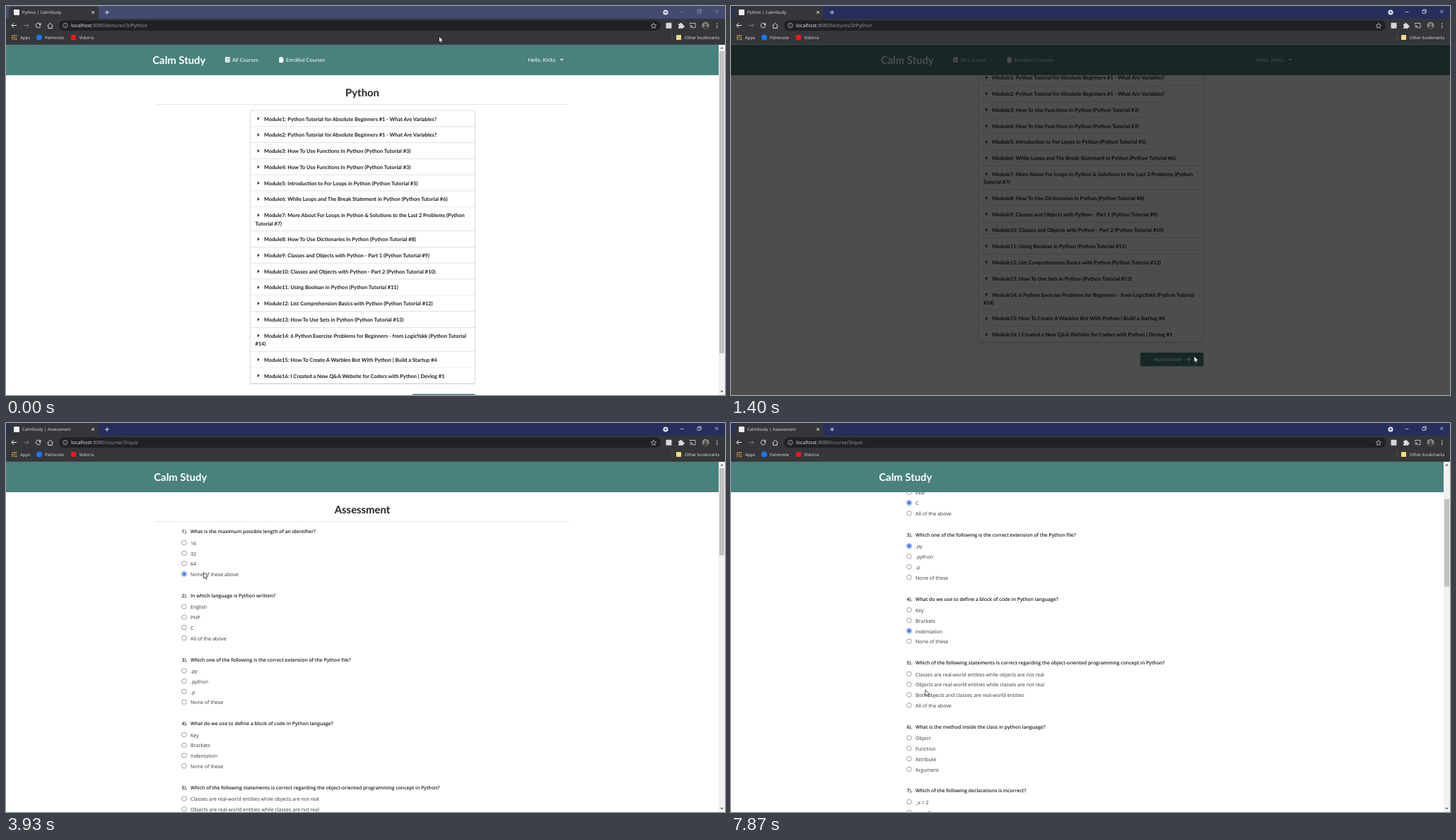
An HTML page with a canvas for the animation above (8 s loop, 1017 by 551 pixels).

```html
<!DOCTYPE html>
<html lang="en">
<head>
<meta charset="utf-8">
<title>Course assessment</title>
<style>
html, body { margin: 0; width: 100%; height: 100%; overflow: hidden; background: #fff; }
canvas { display: block; }
</style>
</head>
<body>
<canvas id="stage" width="1017" height="551"></canvas>
<script>
const W = 1017, H = 551, LOOP = 8000, TOP = 55;
const TEAL = '#48817d', BAR = '#35363a', ICON = '#dcdde0';
const LATO = 'Lato, sans-serif', SANS = '"Open Sans", "Noto Sans", sans-serif';
const BRAND = 'Calm Study', SITE = 'CalmStudy';
const c = document.getElementById('stage').getContext('2d', { alpha: false });

const modules = [
  'Python Tutorial for Absolute Beginners #1 - What Are Variables?',
  'Python Tutorial for Absolute Beginners #1 - What Are Variables?',
  'How To Use Functions In Python (Python Tutorial #3)',
  'How To Use Functions In Python (Python Tutorial #3)',
  'Introduction to For Loops in Python (Python Tutorial #5)',
  'While Loops and The Break Statement in Python (Python Tutorial #6)',
  'More About For Loops in Python & Solutions to the Last 2 Problems (Python\nTutorial #7)',
  'How To Use Dictionaries In Python (Python Tutorial #8)',
  'Classes and Objects with Python - Part 1 (Python Tutorial #9)',
  'Classes and Objects with Python - Part 2 (Python Tutorial #10)',
  'Using Boolean in Python (Python Tutorial #11)',
  'List Comprehension Basics with Python (Python Tutorial #12)',
  'How To Use Sets in Python (Python Tutorial #13)',
  '6 Python Exercise Problems for Beginners - from LogicYakk (Python Tutorial\n#14)',
  'How To Create A Warblen Bot With Python | Build a Startup #4',
  'I Created a New Q&A Website for Coders with Python | Devlog #1'
];

const ABOVE = 'All of the above', NONE = 'None of these';
// question, options, chosen option, time of the choice
const quiz = [
  ['What is the maximum possible length of an identifier?', ['16', '32', '64', 'None of these above'], 3, 3670],
  ['In which language is Python written?', ['English', 'PHP', 'C', ABOVE], 2, 4470],
  ['Which one of the following is the correct extension of the Python file?', ['.py', '.python', '.p', NONE], 0, 5470],
  ['What do we use to define a block of code in Python language?', ['Key', 'Brackets', 'Indentation', NONE], 2, 6270],
  ['Which of the following statements is correct regarding the object-oriented programming concept in Python?',
    ['Classes are real-world entities while objects are not real',
     'Objects are real-world entities while classes are not real',
     'Both objects and classes are real-world entities', ABOVE]],
  ['What is the method inside the class in python language?', ['Object', 'Function', 'Attribute', 'Argument']],
  ['Which of the following declarations is incorrect?', ['_x = 2', '__x = 3']]
];

// cursor: time, x, y
const moves = [
  [130, 612.5, 43], [930, 655, 496], [1930, 655, 496], [2400, 739.5, 335], [2600, 739.5, 335],
  [2730, 674.5, 336], [2800, 674.5, 336], [3600, 279.5, 211.5], [3930, 279.5, 211.5],
  [4330, 263.5, 291], [4730, 263.5, 291], [4930, 262.5, 346], [5130, 262.5, 346], [5200, 262.8, 348],
  [5330, 263, 349.5], [5730, 263, 349.5], [6330, 268.5, 471], [6470, 268.5, 471], [6870, 360, 407],
  [7130, 360, 407], [7400, 286, 365], [7800, 286, 365], [7870, 275, 378]
];

const ramp = (t, a, b) => Math.min(1, Math.max(0, (t - a) / (b - a)));
const smooth = p => p * p * (3 - 2 * p);
const during = (t, a, b) => t >= a && t < b;

function rect(x, y, w, h, color, r = 0) {
  c.fillStyle = color;
  c.beginPath();
  c.roundRect(x, y, w, h, r);
  c.fill();
}
function frameRect(x, y, w, h, color, width) {
  c.strokeStyle = color;
  c.lineWidth = width;
  c.beginPath();
  c.roundRect(x, y, w, h, 2);
  c.stroke();
}
function disc(x, y, r, color) {
  c.fillStyle = color;
  c.beginPath();
  c.arc(x, y, r, 0, 7);
  c.fill();
}
function line(d, color, w = 1) {
  c.strokeStyle = color;
  c.lineWidth = w;
  c.stroke(new Path2D(d));
}
function shape(d, color) {
  c.fillStyle = color;
  c.fill(new Path2D(d));
}
// y is the middle of the capitals
function text(s, x, y, size, color, weight = 400, font = SANS, align = 'left') {
  c.font = `${weight} ${size}px ${font}`;
  c.textAlign = align;
  c.fillStyle = color;
  c.fillText(s, x, y + size * .36);
}

function browser(t) {
  const active = t >= 1070, onQuiz = t >= 2730, loading = during(t, 2540, 2730);
  rect(0, 0, W, 18, active ? '#262f5c' : '#434b71');
  rect(0, 18, W, TOP - 18, BAR);
  rect(0, TOP - .8, W, .8, '#4a4c50');
  rect(4, 1, 127, 18, BAR, [4, 4, 0, 0]);
  if (during(t, 2730, 2800)) {
    disc(15, 9, 3, ICON);
    line('M12 9h6M15 6v6', BAR, .6);
  } else if (!loading) rect(11, 5, 8, 8, '#eceef0', 1);
  text(onQuiz ? `${SITE} | Assessment` : `Python | ${SITE}`, 23, 9, 5.9, '#e4e5e8');
  line('M121 7l4 4M125 7l-4 4M143 6v6M140 9h6', '#eceef0', .9);

  const ctl = active ? '#e8eaf2' : '#8d93ac';
  disc(933, 9, 3.6, '#dfe1e8');
  shape('M931.2 8h3.6l-1.8 2.4z', '#35384f');
  line('M953.5 8.5h5M1003 5.5l4.5 4.5M1007.5 5.5l-4.5 4.5M978 6.5h4v4h-4zM979 6v-1h4.3v4.3h-1', ctl, .7);

  line('M15 27.5h-7M11 24.3l-3.2 3.2 3.2 3.2', '#f1f2f4');
  line('M25 27.5h7M29 24.3l3.2 3.2-3.2 3.2', '#75777b');
  if (loading) line('M42.5 24.5l6 6M48.5 24.5l-6 6', ICON);
  else {
    line('M48.5 26a3.3 3.3 0 1 0 .3 2.3', ICON);
    shape('M49.3 23.8v3.4h-3.4z', ICON);
  }
  line('M58.5 28l4-3.8 4 3.8M59.8 27.5v4h5.4v-4', ICON);

  rect(75, 20.5, 851, 14.5, '#202124', 7.2);
  line('M87.2 27.6a3.3 3.3 0 1 1-6.6 0a3.3 3.3 0 1 1 6.6 0M83.9 27v2.3M83.9 25.4v.8', '#c4c7cb', .7);
  const host = 'localhost';
  text(host, 92, 27.6, 7, '#f1f2f3');
  const x = 92 + c.measureText(host).width;
  text(onQuiz ? ':8080/course/3/quiz' : ':8080/lectures/3/Python', x, 27.6, 7, '#9a9da2');
  line('M916 24.2l1.1 2.4 2.6.3-1.9 1.8.5 2.6-2.3-1.3-2.3 1.3.5-2.6-1.9-1.8 2.6-.3z', ICON, .7);

  rect(933.5, 23.7, 8, 8, '#d3d5d8', 1);
  shape('M951 25.5h2.2a1.3 1.3 0 1 1 2.4 0h2.2v2.2a1.3 1.3 0 1 1 0 2.4v1.7h-6.8v-2a1.2 1.2 0 1 0 0-2.4z', ICON);
  line('M967.5 26v-1.5h7.5v6.3h-3.5M967.5 30.5v.6M967.5 28.8a2 2 0 0 1 2 2.2M967.5 27.3a3.6 3.6 0 0 1 3.6 3.7', ICON, .8);
  disc(989.5, 27.7, 5, '#8c8a83');
  disc(989.5, 26.3, 1.8, '#47443f');
  shape('M986 31a3.5 3 0 0 1 7 0a5 5 0 0 1-7 0z', '#47443f');
  for (const y of [25, 27.7, 30.4]) disc(1005.7, y, .8, ICON);

  const dots = ['#e5533d', '#e9b43b', '#57a865'];
  for (let i = 0; i < 9; i++) {
    const col = i % 3, row = (i - col) / 3;
    rect(8 + col * 2.7, 41 + row * 2.7, 1.8, 1.8, dots[(col + row) % 3]);
  }
  text('Apps', 20, 44.5, 6, '#e6e7e9');
  disc(47, 44.5, 4, '#1877f2');
  text('Palmnote', 55, 44.5, 6, '#e6e7e9');
  rect(92, 41, 7, 7, '#f01818', 1);
  text('Vidorra', 103.5, 44.5, 6, '#e6e7e9');
  line('M942 40v9', '#5c5e63', .7);
  rect(948, 41, 7, 7, '#f7da83', .8);
  text('Other bookmarks', 960, 44.5, 6, '#e6e7e9');
}

function nav(brandX, dx, full) {
  rect(0, TOP, W, 98 - TOP, TEAL);
  text(BRAND, brandX + dx, 76.5, 14.83, '#fff', 700, LATO);
  if (!full) return;
  c.save();
  c.translate(dx, 0);
  rect(310, 72.3, 6.7, 7.8, '#fff', 1);
  line('M311.5 74.2h4M311.5 75.8h4M311 78.3h5.5', TEAL, .6);
  text('All Courses', 320, 76.3, 7.45, '#fff', 400, LATO);
  rect(386.3, 73, 6, 7.2, '#fff', .8);
  rect(387.8, 72, 3, 2, '#fff', .8);
  line('M388 74h2.6', TEAL, .6);
  text('Enrolled Courses', 396, 76.3, 7.45, '#fff', 400, LATO);
  text('Hello, Kirita', 738.5, 76.3, 7.45, '#fff', 400, LATO);
  shape('M783.7 75h5l-2.5 2.6z', '#fff');
  c.restore();
}

function heading(s, x1, x2) {
  text(s, 504, 122.5, 14.83, '#212325', 700, LATO, 'center');
  rect(x1, 139, x2 - x1, .8, '#dcdcdd');
}

function lectures(scroll, dx) {
  c.save();
  c.translate(dx, -scroll);
  heading('Python', 213, 795);
  rect(345, 534.7, 318.5, 1.2, '#e0e0e1', 1);
  frameRect(345.3, 148, 318.2, 386.7, '#d2d2d3', .8);
  let y = 148;
  modules.forEach((m, i) => {
    const [first, second] = m.split('\n'), mid = y + 11.9;
    if (i) rect(345.5, y - .3, 318, .7, '#d9d9da');
    shape(`M355.8 ${mid - 2.8}l2.7 2.5-2.7 2.5z`, '#1c1d1f');
    text(`Module${i + 1}: ${first}`, 365, mid, 7.416, '#1c1d1f', 700, LATO);
    if (second) text(second, 352.5, mid + 11.3, 7.416, '#1c1d1f', 700, LATO);
    y += second ? 33.9 : 22.78;
  });
  rect(574.5, 549.4, 89.5, 19.2, TEAL, 2);
  text('Assessment', 593.6, 559, 7.416, '#fff', 700, LATO);
  line('M638.5 558.8h6.5M642.3 555.8l3 3-3 3', '#fff', 1.1);
  c.restore();
  nav(207.3, dx, true);
}

function test(t, scroll) {
  c.save();
  c.translate(0, -scroll);
  heading('Assessment', 211.5, 797.5);
  quiz.forEach(([question, options, pick, when], i) => {
    const y = 153.8 + 90.63 * i;
    text(`${i + 1}).`, 248.5, y, 6.8, '#1b1c1d', 600);
    text(question, 261, y, 6.8, '#1b1c1d', 600);
    options.forEach((o, j) => {
      const oy = y + 16.4 + 14.8 * j, on = j === pick && t >= when;
      c.strokeStyle = on ? '#2f6fed' : '#77797c';
      c.lineWidth = on ? .9 : .7;
      c.beginPath();
      c.arc(252, oy - .7, 3.3, 0, 7);
      c.stroke();
      if (on) disc(252, oy - .7, 2.1, '#2f6fed');
      text(o, 261, oy, 7.06, '#33363a');
    });
  });
  c.restore();
  nav(209.3, 0, false);
}

function modal(dx, scale, alpha) {
  c.save();
  c.globalAlpha = alpha;
  c.translate(504 + dx, 304);
  c.scale(scale, scale);
  c.translate(-504, -304);
  shape('M500.5 263.5h8q.7 0 .6.8l-1.2 16q-.1 1.5-1.5 1.5h-3.8q-1.4 0-1.5-1.5l-1.2-16q-.1-.8.6-.8z', '#fff');
  disc(504.5, 287.8, 4.7, '#fff');
  text('Do you want to start the test?', 504.5, 301.3, 9.53, '#fff', 700, LATO, 'center');
  frameRect(642.5, 325.5, 44, 18.5, '#e0e0e0', 1);
  text('Cancel', 664.5, 334.7, 7.416, '#fff', 700, LATO, 'center');
  rect(696, 325, 50, 19.5, '#98d7ef', 2);
  text('Start >', 718.5, 334.7, 7.416, '#47727f', 700, LATO, 'center');
  c.restore();
}

function scrollbar(y, h) {
  rect(1008, TOP, 9, H, '#f1f1f1');
  rect(1009, y, 7, h, '#c1c1c1');
  shape('M1010.3 60.5h4.4l-2.2-2.5z', '#606060');
  shape('M1010.3 545h4.4l-2.2 2.5z', '#606060');
}

function cursor(t) {
  const next = moves.findIndex(m => m[0] > t);
  const b = moves.at(next), a = next > 0 ? moves[next - 1] : b;
  const p = a === b ? 0 : smooth(ramp(t, a[0], b[0]));
  const hand = during(t, 900, 1130) || during(t, 2330, 2640);
  c.save();
  c.translate(a[1] + (b[1] - a[1]) * p, a[2] + (b[2] - a[2]) * p);
  const d = hand
    ? 'M-1 1Q0-.6 1 1V4.2L4.8 5.3V8.3L3.8 11H-1.3L-3.8 7Q-3.2 5.6-1 7.2Z'
    : 'M0 0V8.5L1.9 6.8 3.2 9.8 4.6 9.2 3.3 6.3H6Z';
  shape(d, '#fff');
  line(d, '#111', .7);
  c.restore();
}

function draw(t) {
  const onQuiz = t >= 2730, locked = during(t, 1130, 2540);
  const dx = locked ? 4.4 : 0;
  rect(0, 0, W, H, '#fff');
  if (onQuiz) {
    const p = smooth(ramp(t, 6470, 6870));
    test(t, 176.6 * p);
    scrollbar(64 + 44 * p, 123.5);
  } else {
    const p = smooth(ramp(t, 330, 800));
    lectures(58.3 * p, dx);
    const open = smooth(ramp(t, 1420, 1730));
    const left = 1 - smooth(ramp(t, 2530, 3030));
    const dim = .85 * (1 - (1 - ramp(t, 1130, 1630)) ** 2.2) * left;
    rect(0, TOP, W, H, `rgba(0,0,0,${dim})`);
    modal(dx, .8 + .2 * open, open * left);
    if (!locked) scrollbar(64 + 49.5 * p, 428);
  }
  if (during(t, 2540, 2900)) {
    rect(0, 540, 338, 11, '#292b2f', [0, 2, 0, 0]);
    text('Waiting for www.vidorra.com...', 2.5, 545.7, 6.05, '#c3c5c9');
  }
  browser(t);
  cursor(t);
}

c.textRendering = 'geometricPrecision';
const start = performance.now();
function frame() {
  draw((performance.now() - start) % LOOP);
  requestAnimationFrame(frame);
}
frame();
</script>
</body>
</html>
```
